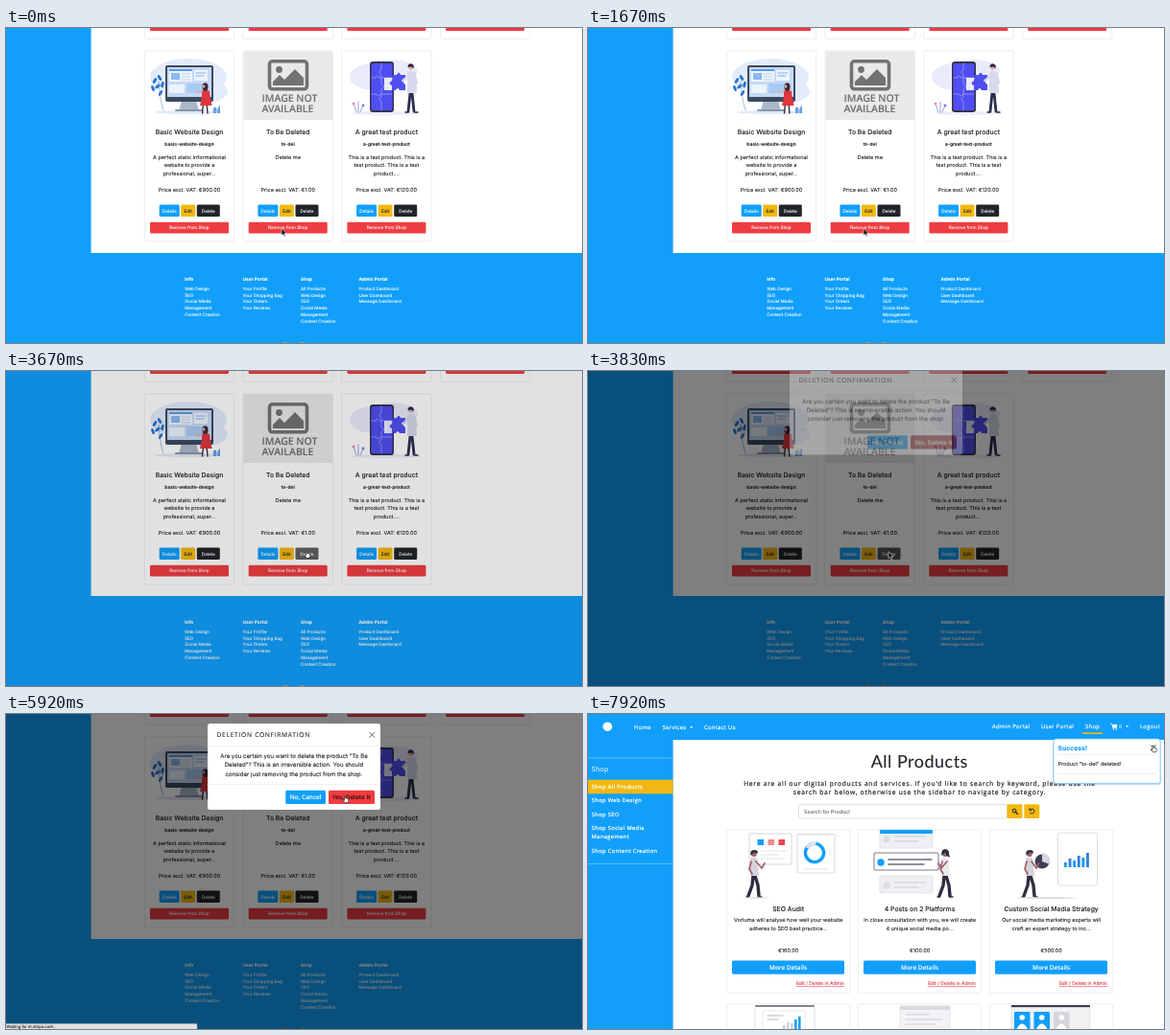
Write an HTML page that moves like this. It is 600 px wide and 329 px high and loops after 8 s.

```html
<!DOCTYPE html>
<html lang="en">
<head>
<meta charset="utf-8">
<title>Product deletion</title>
<style>
html, body { margin: 0; width: 100%; height: 100%; overflow: hidden; background: #119ffa; }
svg { display: block; width: 100vw; height: 100vh; }
text {
  font-family: Inter, sans-serif; font-size: 5.55px; white-space: pre; text-rendering: geometricPrecision;
  color: #212529; fill: currentColor; stroke: currentColor; stroke-width: .1px;
}
.o { font-family: "Open Sans", sans-serif; }
.m { text-anchor: middle; }
.w { color: #fff; }
.h { font-size: 6.85px; font-weight: 500; }
.slug { font-size: 4.85px; font-weight: 600; }
.b { font-size: 4.6px; }
.foot { font-size: 4.55px; }
.bold { font-weight: 700; }
.nav { font-size: 5.9px; letter-spacing: .3px; stroke-width: .18px; }
.side { font-size: 5.7px; letter-spacing: .4px; stroke-width: .22px; }
.lead { font-size: 6.7px; letter-spacing: .755px; stroke-width: .2px; }
.btn { font-size: 6.4px; font-weight: 600; }
.modal { font-size: 6.06px; }
.title { font-family: Lato, sans-serif; font-size: 18px; letter-spacing: .5px; }
</style>
</head>
<body>
<svg id="stage" viewBox="0 0 600 329"></svg>
<script>
const BLUE = '#119ffa', RED = '#ee3d42', GOLD = '#f3b912', INK = '#212529', LINE = '#e4e5e8', NAVY = '#2f2e41';

const text = (x, y, s, cls = '', extra = '') => `<text x="${x}" y="${y}" class="${cls}" ${extra}>${s}</text>`;
const lines = (x, y, step, list, cls) => list.map((s, i) => text(x, y + i * step, s, cls)).join('');
const box = (x, y, w, h, fill, r = 0, extra = '') =>
  `<rect x="${x}" y="${y}" width="${w}" height="${h}" rx="${r}" fill="${fill}" ${extra}/>`;
const frame = (x, y, w, h, color = LINE, r = 1.5, fill = '#fff') =>
  box(x, y, w, h, fill, r, `stroke="${color}" stroke-width=".7"`);
const oval = (x, y, rx, ry, fill) => `<ellipse cx="${x}" cy="${y}" rx="${rx}" ry="${ry}" fill="${fill}"/>`;
const dot = (x, y, r, fill) => oval(x, y, r, r, fill);
const shape = (d, fill) => `<path d="${d}" fill="${fill}"/>`;
const stroke = (d, color, w = 1) =>
  `<path d="${d}" fill="none" stroke="${color}" stroke-width="${w}" stroke-linecap="round" stroke-linejoin="round"/>`;
const group = (body, attrs = '') => `<g ${attrs}>${body}</g>`;
const caret = (x, y) => shape(`M${x} ${y}h3.4l-1.7 1.8z`, '#fff');

// ---- dashboard page ----
function deskArt() {
  let s = oval(190, 51, 40, 19, '#e3ebfb') + oval(204, 66, 27, 13, '#e3ebfb') + oval(190, 88, 35, 1.8, '#dfe9f6');
  s += shape('M183 76h15l3 10h-21z', '#aab7c8') + box(176, 85, 29, 2, '#8796aa', 1);
  s += box(166, 39, 50, 38, '#3b4a60', 2) + box(168, 41, 46, 31, '#c6d9f3');
  s += box(170, 43, 24, 13, '#edf4fd') + box(170, 43, 24, 2, '#5c9be8') + box(172, 47, 9, 7, '#8bb9f0');
  s += stroke('M183 48h9M183 51h8M183 54h9', '#b4c7df', .8);
  s += box(196, 44, 14, 11, '#edf4fd') + stroke('M198 47h10M198 50h8', '#7eaee8', 1);
  s += box(170, 59, 16, 9, '#edf4fd') + box(188, 58, 18, 10, '#a8cbf5');
  for (const [x, y, a] of [[155, 55, 30], [160, 52, -30], [158, 61, 50], [163, 59, 10], [153, 63, -20], [161, 68, 30]])
    s += `<ellipse cx="${x}" cy="${y}" rx="1.5" ry="3.3" fill="#2873cf" transform="rotate(${a} ${x} ${y})"/>`;
  s += stroke('M164 86q-4-12-5-30', '#5f94d5', .6);
  s += stroke('M205.5 79l-1 10M209 79l1 10', '#3c2a3c', 1.4);
  s += shape('M204 66l4-2 4 2 .6 6 2 9h-12.6l2-9z', '#df363e') + stroke('M204 67l-4 1-2-4', '#e9aa93', 1.2);
  s += oval(207.5, 61.5, 3, 4.2, '#38283a') + oval(206, 61, 1.3, 1.8, '#e9aa93');
  return s + shape('M216 89q-1-8 3-6 1 2 0 6zM220 89q0-7 3-8v8z', '#65a1ea');
}

function missingArt() {
  let s = box(247.3, 24.3, 93, 71.7, '#e9e9e9') + box(274.5, 34.8, 39, 29, 'none', 3, 'stroke="#727272" stroke-width="3.6"');
  s += dot(284.5, 43.5, 3.4, '#727272') + shape('M278 60v-4l7-7 5 5 11-11 9 9v8z', '#727272');
  const big = 'style="font-size:10.5px;font-weight:600;color:#707070"';
  return s + text(266.5, 77, 'IMAGE NOT', 'o', big) + text(266.5, 88, 'AVAILABLE', 'o', big);
}

function puzzleArt() {
  let s = oval(383, 51, 25, 14, '#e9ebfb') + oval(401, 45, 28, 12, '#e9ebfb') + oval(396, 89, 36, 2, '#eceefa');
  s += box(379, 35, 25, 53, '#34344d', 3) + box(380.5, 37, 22, 49, '#504ef0', 2);
  s += stroke('M391 37v7q-4 1 0 5v10q5 1 0 5v8q-4 2 0 5v9M381 52h4q1-4 4 0h13M381 69h5q2 4 4 0h12', '#a6a8ff', .7);
  s += box(394, 52, 9, 13, '#e9ebfb') + shape('M403 49h4q2-5 4 0h5v5q-5 1 0 5v6h-6q-2-4-4 0h-4v-5q-5-2 0-5z', '#504ef0');
  s += stroke('M421 68l-2 19M423 68l2 19', '#2b2f51', 2.8) + stroke('M419 88h-3M426 88h3', '#262640', 1.4);
  s += shape('M418 46q5-3 9 1l1 21h-10z', '#d6daea') + stroke('M420 49l-7 6M426 49l2 8-5 5', '#d6daea', 2.1);
  s += dot(421.5, 41.5, 2.4, '#efad99') + shape('M418.5 41q0-4 4-3.6 3 .5 2 5l-2-2z', '#2a2945');
  return s + stroke('M365 88l-3-9M367 88v-11M369 88l3-7', '#8588dd', .8) + dot(362, 79, 1.6, '#e891a8') + dot(372, 81, 1.4, '#7779eb');
}

const products = [
  ['Basic Website Design', 'basic-website-design', ['A perfect static informational', 'website to provide a', 'professional, super...'], '900.00', deskArt],
  ['To Be Deleted', 'to-del', ['Delete me'], '1.00', missingArt],
  ['A great test product', 'a-great-test-product', ['This is a test product. This is a', 'test product. This is a test', 'product....'], '120.00', puzzleArt]
];

function adminCard([name, slug, about, price, art], i) {
  const x = 144.3 + i * 102.7, c = x + 46.7, id = i === 1 ? 'id="hot"' : '';
  return frame(x, 23.8, 93.4, 199.2) + art() +
    text(c, 111.2, name, 'h m') + text(c, 123.4, slug, 'slug m') + lines(c, 136.5, 8.8, about, 'm') +
    text(c, 171, `Price excl. VAT: €${price}`, 'm') +
    box(x + 15.4, 184.6, 21, 12.4, BLUE, 1.3) + box(x + 37.9, 184.6, 15, 12.4, GOLD, 1.3) +
    box(x + 54.5, 184.6, 24, 12.4, INK, 1.3, id) +
    text(x + 25.9, 192.5, 'Details', 'b m w') + text(x + 45.4, 192.5, 'Edit', 'b m') + text(x + 66.5, 192.5, 'Delete', 'b m w') +
    box(x + 5.7, 202.8, 82, 11.8, RED, 1.3) + text(c, 210.4, 'Remove from Shop', 'b m w');
}

const footer = [
  ['Info', 'Web Design', 'SEO', 'Social Media', 'Management', 'Content Creation'],
  ['User Portal', 'Your Profile', 'Your Shopping Bag', 'Your Orders', 'Your Reviews'],
  ['Shop', 'All Products', 'Web Design', 'SEO', 'Social Media', 'Management', 'Content Creation'],
  ['Admin Portal', 'Product Dashboard', 'User Dashboard', 'Message Dashboard']
];

function dashboard() {
  let s = box(0, 0, 600, 329, BLUE) + box(88.6, 0, 512, 235, '#fff');
  for (let i = 0; i < 4; i++) {
    const x = 144.3 + i * 102.7;
    s += frame(x, -20, 93.4, 31.3) + box(x + 5.7, -8, 82, 11, RED, 1.3);
  }
  s += products.map(adminCard).join('');
  footer.forEach(([head, ...items], i) => {
    const x = 186.2 + i * 60.4;
    s += text(x, 264.2, head, 'foot bold w', 'style="font-size:4.8px"') + lines(x, 273.6, 6.9, items, 'foot w');
  });
  return s + oval(291, 329.5, 2.5, 1.5, '#c2a75a') + oval(309, 329.5, 2.5, 1.5, '#c2a75a');
}

// ---- dialog ----
function dialog() {
  return box(210, 10, 180, 90, '#fff', 2.5) + stroke('M210 33.3h180M210 73.6h180', LINE, .6) +
    text(219.5, 24.2, 'DELETION CONFIRMATION', 'o', 'style="font-size:6.7px;letter-spacing:.7px"') +
    stroke('M378.8 19.2l5 5M383.8 19.2l-5 5', '#555', .9) +
    lines(300, 46, 9.4, ['Are you certain you want to delete the product "To Be',
      'Deleted"? This is an irreversible action. You should', 'consider just removing the product from the shop.'], 'modal m') +
    box(291.3, 79.7, 41.7, 14.3, BLUE, 1.6) + text(312.2, 89.1, 'No, Cancel', 'o btn m w') +
    box(336, 79.7, 48, 14.3, RED, 1.6, 'id="yes"') + text(360, 89.1, 'Yes, Delete It', 'o btn m', 'id="yesText"');
}

const status = () => box(-2, 323.6, 201, 8, '#dfe0e2', 1, 'stroke="#aaa" stroke-width=".5"') +
  text(.5, 328.2, 'Waiting for m.stripe.com...', '', 'style="font-size:4.2px"');

// ---- shop page ----
const person = (x, y, skin, shirt, reach) => group(
  stroke('M-1 18l-1 10-4 11M1 18l3 10 1 11', NAVY, 3.4) + stroke('M-6 40h-2M5 40h3', NAVY, 1.4) +
  shape('M-4 0q4-2.5 7.5 0l1.5 18h-9z', shirt) + stroke(`M2 3l${reach} 7l${reach / 2} -5`, skin, 1.7) +
  stroke('M-3 3l-2 8 3 5', skin, 1.7) + dot(0, -4.5, 2.6, skin) + shape('M-3.4-3q-1.6-6 3.4-6 5 0 3.4 4l-3.4-1.5z', NAVY),
  `transform="translate(${x} ${y})"`);

function auditArt() {
  let s = frame(168, 125, 44, 32, '#c9c9cf', 1) + frame(218, 125.5, 39, 40.5, '#c9c9cf', 1);
  [BLUE, '#f08a90', '#e9484d'].forEach((c, i) => { s += box(176.5 + i * 11, 131, 6.5, 6, c); });
  s += stroke('M180 143h26M180 147h18M180 151h23', '#e2e2e8', 1.2);
  s += `<circle cx="236" cy="145" r="9.6" fill="none" stroke="${BLUE}" stroke-width="3.4"/>` +
    stroke('M229 138.4a9.6 9.6 0 0 1 7-3', '#e3e3e8', 3.4) + stroke('M224 162h25', '#e2e2e8', 1);
  return s + person(173, 151, '#a0616a', '#d3d3da', 6) + oval(175, 192, 14, .7, '#ddd');
}

function postsArt() {
  let s = '';
  [[304, 121, 55, 19], [298, 145, 67, 18], [304, 169, 55, 18]].forEach(([x, y, w, h], i) => {
    const main = i === 1;
    s += frame(x, y, w, h, main ? '#3f3d56' : '#dcdce2', 1, main ? '#fff' : '#f0f0f4') +
      dot(x + 7, y + 10, 3.7, main ? BLUE : '#dcdce4') +
      stroke(`M${x + 15} ${y + 7}h${w - 22}M${x + 15} ${y + 12}h${w - 30}`, main ? '#6b6a80' : '#d8d8e0', 1.4);
  });
  s += box(304, 121, 55, 4, BLUE, 1);
  return s + person(372, 151, '#a0616a', '#e9e9ee', -6) + shape('M368.5 143q3.5-4 7 0l1.5 7-3.5-2-1-3z', NAVY);
}

function strategyArt() {
  let s = frame(489.5, 124, 41, 55, '#cfcfd6', 2);
  [5, 9, 7, 12, 10, 15].forEach((h, i) => { s += box(496 + i * 4.6, 160 - h, 2.9, h, i % 2 ? '#3b7fe0' : BLUE); });
  s += stroke('M495 161h29', '#dedee5', .7) + dot(473, 154, 7.5, '#3f3d56') + shape('M473 154v-9a9 9 0 0 1 8 12z', '#d5d5de');
  return s + person(460, 151, '#a0616a', '#d3d3da', 5) + oval(478, 192, 33, .7, '#d4d4d9');
}

const shopItems = [
  ['SEO Audit', ['Vorluma will analyse how well your website', 'adheres to SEO best practice...'], '160.00', auditArt],
  ['4 Posts on 2 Platforms', ['In close consultation with you, we will create', '4 unique social media po...'], '100.00', postsArt],
  ['Custom Social Media Strategy', ['Our social media marketing experts will', 'craft an expert strategy to inc...'], '500.00', strategyArt]
];

function shopCard([name, about, price, art], i) {
  const x = 144.3 + i * 137, c = x + 64.3;
  return frame(x, 121, 128.6, 170.6) + art() + text(c, 206.3, name, 'h m') + lines(c, 217, 8.7, about, 'm') +
    text(c, 249, `€${price}`, 'm') + box(x + 5.7, 257.6, 117, 14.2, BLUE, 1.5) + text(c, 267, 'More Details', 'o btn m w') +
    text(x + 122.7, 283.2, 'Edit / Delete in Admin', '', 'text-anchor="end" text-decoration="underline" style="font-size:4.95px;color:#dc3545"') +
    frame(x, 303, 128.6, 40);
}

function nextRow() {
  let s = frame(174, 305, 62, 40, '#d3d3da', 2) + box(174, 304, 62, 2, '#85858f', 1) + frame(182, 310, 44, 30, '#dddde4', 1);
  s += stroke('M187 315h16M187 319h11', '#cfcfd8', 1.3);
  [4, 7, 6, 10, 13].forEach((h, i) => { s += box(203 + i * 4, 329 - h, 2.6, h, i > 2 ? BLUE : '#cfd4df'); });
  s += frame(325, 305, 52, 30, '#dedee4', 1, '#f3f3f6') + box(325, 305, 52, 4, '#d9d9e0');
  s += stroke('M331 314h24M331 319h38M331 324h30', '#dadae1', 1.4);
  s += frame(441, 305, 82, 30, '#dcdce2', 1, '#f1f1f4') + box(441, 304, 82, 2.2, '#3f3d56');
  for (let i = 0; i < 3; i++) {
    const x = 444 + i * 20.5;
    s += box(x, 311, 16.5, 19, i < 2 ? BLUE : '#d5d5dc', 1) + dot(x + 8.2, 317, 2.8, '#fff') + shape(`M${x + 2.5} 329q5.7-11 11.4 0z`, '#fff');
  }
  return s;
}

function shop() {
  let s = box(0, 0, 600, 329, '#fff') + box(0, 0, 600, 27, BLUE) + box(0, 0, 88.6, 329, BLUE);
  s += dot(20.3, 13.2, 4.8, '#fff');
  for (const [x, y, t] of [[48, 16, 'Home'], [77.7, 16, 'Services'], [121, 16, 'Contact Us'], [421, 15, 'Admin Portal'],
    [472, 15, 'User Portal'], [518, 15, 'Shop'], [575, 15, 'Logout']]) s += text(x, y, t, 'o nav w');
  s += caret(106, 13) + caret(560, 12.2) + box(515, 19.3, 21, 1.6, GOLD) + text(553.2, 15, '0', 'o w', 'style="font-size:5px"');
  s += stroke('M544.5 10.5h1.4l1 4.2h3.8', '#fff', .8) + shape('M546 11h5.5l-.8 3h-4z', '#fff') + dot(547.2, 16, .7, '#fff') + dot(550.2, 16, .7, '#fff');

  s += stroke('M0 46h88.5M0 156.5h88.5', '#8ed2fd', .6) + text(3.8, 60.3, 'Shop', 'o w', 'style="font-size:6.8px;letter-spacing:.4px"');
  s += box(0, 68.7, 88.6, 14.6, GOLD);
  [['Shop All Products', 78], ['Shop Web Design', 92.4], ['Shop SEO', 106.8], ['Shop Social Media', 121.2],
    ['Management', 130.4], ['Shop Content Creation', 144.6]].forEach(([t, y]) => { s += text(3.8, y, t, 'o side w'); });

  s += text(345.3, 56, 'All Products', 'title m');
  s += lines(345.5, 75.2, 9, ["Here are all our digital products and services. If you'd like to search by keyword, please use the",
    'search bar below, otherwise use the sidebar to navigate by category.'], 'o lead m');
  s += frame(219.5, 94.5, 217, 14.4, '#ced4da') + text(225, 103.8, 'Search for Product', '', 'style="font-size:5.4px;color:#636a70"');
  s += box(436.5, 94.3, 16, 14.8, GOLD, 1.3) + box(454.3, 94.3, 16, 14.8, GOLD, 1.3);
  s += `<circle cx="444" cy="101" r="1.9" fill="none" stroke="${INK}" stroke-width="1"/>` + stroke('M445.5 102.5l2 2', INK, 1.2);
  s += stroke('M460.3 100.2a2.5 2.5 0 1 1 .3 3M459.9 98.5v2h2', INK, .9);
  return s + shopItems.map(shopCard).join('') + nextRow();
}

const toast = () => box(484, 26.5, 113, 48, '#0a6fb5', 3, 'opacity=".14"') + box(484.5, 27, 112, 46.6, '#0a6fb5', 3, 'opacity=".25"') +
  frame(485, 26, 111, 46.4, '#7cc8f7', 2.5) +
  text(489.5, 37.6, 'Success!', 'bold', `style="font-size:6.8px;color:${BLUE}"`) +
  stroke('M489.5 42.3h101.5M489.5 62.4h101.5', '#d9dde0', .6) + stroke('M586.3 32.6l5 5M591.3 32.6l-5 5', '#444', .9) +
  text(489.5, 53.6, 'Product "to-del" deleted!');

const arrow = '<path id="arrow" d="M0 0V7.2L1.7 5.7 2.8 8.2 4 7.6 2.9 5.2H5.2Z" fill="#111" stroke="#fff" stroke-width=".5"/>';
const hand = '<path id="hand" transform="scale(.85)" d="M-.6 .3Q.2-.6.9 .3V2.6Q2-.1 2.3 2.9 3.4 2.2 3.6 3.4 4.6 2.9 4.6 4.3L4.2 6.6 3.5 8H0L-2.2 5.2Q-2.3 4-.6 5Z" fill="#fff" stroke="#111" stroke-width=".75"/>';

const stage = document.getElementById('stage');
stage.innerHTML = group(
  group(dashboard()) + '<rect id="shade" width="600" height="329"/>' +
  group(dialog(), 'id="dialog"') + group(status(), 'id="status"'), 'id="before"') +
  group(shop() + group(toast(), 'id="toast"'), 'id="after"') + group(arrow + hand, 'id="cursor"');

const el = {};
stage.querySelectorAll('[id]').forEach(n => { el[n.id] = n; });

// ---- motion ----
const LOOP = 8000, PAGE = 6300;
const path = [[0, 287, 209.5], [1650, 287, 209.5], [2350, 313, 188.5], [4150, 313, 188.5], [4400, 320, 187],
  [4500, 320, 187], [5100, 353, 86], [6650, 353, 86], [7400, 588.5, 33], [LOOP, 588.5, 33]];
const ramp = (t, from, len) => Math.min(1, Math.max(0, (t - from) / len));
const smooth = k => k * k * (3 - 2 * k);
const out = k => 1 - (1 - k) ** 2;
const mix = (a, b, k) => `rgb(${a.map((v, i) => Math.round(v + (b[i] - v) * k))})`;
const show = (node, on) => node.setAttribute('visibility', on ? 'visible' : 'hidden');

function cursorAt(t) {
  const i = path.findIndex(p => p[0] > t), [t0, x0, y0] = path[i - 1], [t1, x1, y1] = path[i];
  const k = smooth((t - t0) / (t1 - t0));
  return [x0 + (x1 - x0) * k, y0 + (y1 - y0) * k];
}

function draw(t) {
  const [x, y] = cursorAt(t);
  el.cursor.setAttribute('transform', `translate(${x} ${y})`);
  const pointing = (t > 2200 && t < 3800) || (t > 5000 && t < PAGE) || t > 7350;
  show(el.hand, pointing);
  show(el.arrow, !pointing);

  el.hot.setAttribute('fill', mix([33, 37, 41], [94, 96, 99], ramp(t, 2200, 150) - ramp(t, 3800, 150)));
  el.shade.setAttribute('opacity', .5 * smooth(ramp(t, 3624, 150)));
  const open = out(ramp(t, 3780, 300));
  el.dialog.setAttribute('opacity', open);
  el.dialog.setAttribute('transform', `translate(0 ${-18 * (1 - open)})`);

  const over = ramp(t, 5000, 150);
  el.yes.setAttribute('fill', mix([160, 40, 44], [240, 60, 64], over));
  el.yesText.style.color = mix([255, 255, 255], [60, 18, 22], over);

  const loaded = t >= PAGE;
  el.before.style.display = loaded ? 'none' : '';
  el.after.style.display = loaded ? '' : 'none';
  el.status.style.display = t >= 5500 ? '' : 'none';
  el.toast.setAttribute('opacity', ramp(t, PAGE + 80, 150));
}

const start = performance.now();
function tick() {
  draw((performance.now() - start) % LOOP);
  requestAnimationFrame(tick);
}
tick();
</script>
</body>
</html>
```
